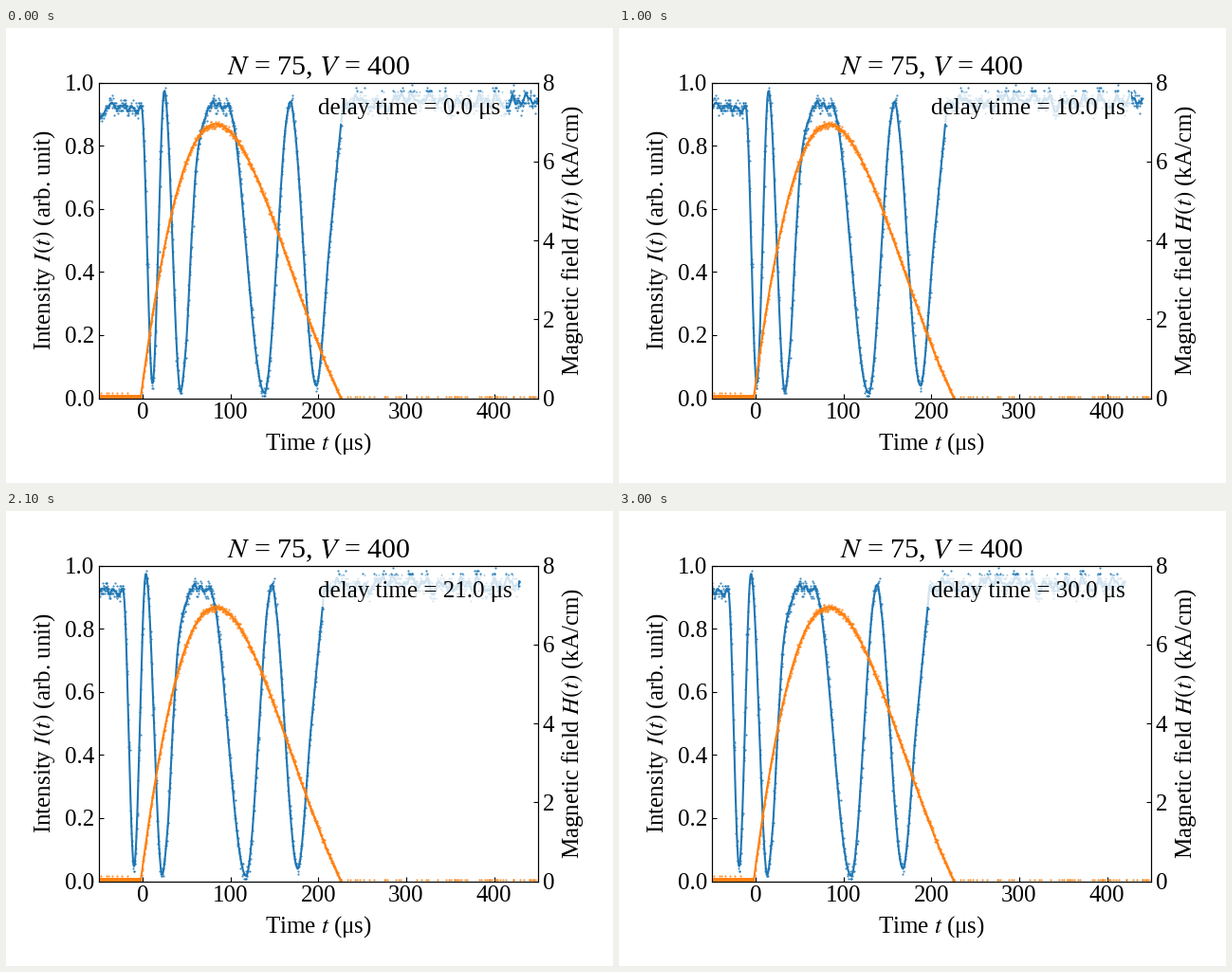
A matplotlib script for the animation above (3.1 s loop, 640x480 px).

```python
import numpy as np
import matplotlib.pyplot as plt
from matplotlib.animation import FuncAnimation

plt.rcParams.update({
    "font.family": "Liberation Serif",
    "mathtext.fontset": "stix",
    "font.size": 18,
    "xtick.direction": "in",
    "ytick.direction": "in",
})

W, H, DPI = 640, 480, 100
BLUE, ORANGE = "#1f77b4", "#ff7f0e"
STEPS, INTERVAL = 31, 100
PULSE_START, PULSE_END = -2.5, 226

# Turning points of the intensity: (time in µs, value)
KNOTS = np.array([
    (-60, 0.925), (-1.5, 0.925), (11, 0.048), (24.5, 0.972), (43, 0.024),
    (49, 0.16), (55, 0.48), (61, 0.74), (66, 0.84), (71, 0.89), (77, 0.925),
    (97, 0.93), (138.5, 0.018), (167.7, 0.937), (197.4, 0.04), (213, 0.5),
    (226, 0.87), (229, 0.942), (460, 0.942),
])


def monotone_curve(x, knots):
    """Cubic Hermite curve that is flat at every local extremum."""
    kx, ky = knots.T
    h = np.diff(kx)
    d = np.diff(ky) / h
    slope = np.zeros(len(kx))
    same = d[:-1] * d[1:] > 0
    a, b = d[:-1][same], d[1:][same]
    slope[1:-1][same] = 2 * a * b / (a + b)
    i = np.clip(np.searchsorted(kx, x, side="right") - 1, 0, len(h) - 1)
    u = (x - kx[i]) / h[i]
    return ((1 + 2 * u) * (1 - u) ** 2 * ky[i]
            + u * (1 - u) ** 2 * h[i] * slope[i]
            + u ** 2 * (3 - 2 * u) * ky[i + 1]
            + u ** 2 * (u - 1) * h[i] * slope[i + 1])


def smooth_noise(rng, n, width):
    k = np.arange(-4 * width, 4 * width + 1)
    kernel = np.exp(-0.5 * (k / width) ** 2)
    out = np.convolve(rng.normal(size=n + 8 * width), kernel, "valid")
    return out / out.std()


def quantize(v, step):
    return np.round(v / step) * step


rng = np.random.default_rng(7)
t = np.arange(-50, 450.2, 0.4)
n = len(t)

# Intensity: smooth curve and scattered samples
base = monotone_curve(t, KNOTS)
flat = np.clip((base - 0.86) / 0.06, 0, 1) * ((t < 10) | (t > 70))
late = t > 228
curve = base + smooth_noise(rng, n, 4) * (0.001 + 0.012 * flat)
samples = np.interp(t + rng.normal(size=n) * 0.5, t, curve)
samples += rng.normal(size=n) * np.where(late, 0.014, 0.011)
samples += late * (rng.random(n) < 0.06) * 0.02
samples = quantize(np.minimum(samples, 0.99), 0.008)

# Magnetic field: damped half sine with a small offset before the pulse
before, after = t < PULSE_START, t > PULSE_END
phase = np.pi * (t - PULSE_START) / (PULSE_END - PULSE_START)
pulse = 12.3 * np.exp(-0.00574 * (t - PULSE_START)) * np.sin(phase)
field = np.select([before, after], [0.06, -0.12], np.maximum(pulse, 0.04))
field_dots = quantize(field + rng.normal(size=n) * 0.045, 0.04)
field_dots[before] = np.where(rng.random(n) < 0.05, 0.14, 0.05)[before]
chance = np.where(t > 340, 0.12, 0.05)
field_dots[after] = np.where(rng.random(n) < chance, 0.05, -0.2)[after]

fig = plt.figure(figsize=(W / DPI, H / DPI), dpi=DPI, facecolor="white")
ax = fig.add_axes([98 / W, 89.4 / H, 462.8 / W, 333 / H])
ax.set(xlim=(-50, 450), ylim=(0, 1), xticks=range(0, 401, 100))
ax.set_title("$N$ = 75, $V$ = 400")
ax2 = ax.twinx()
ax2.set(ylim=(0, 8), yticks=range(0, 9, 2))


def label(x, y, s, rotation=0):
    fig.text(x / W, 1 - y / H, s, ha="center", va="baseline",
             rotation=rotation, rotation_mode="anchor")


label(329.4, 445, "Time $t$ (μs)")
label(47, 223.8, "Intensity $I(t)$ (arb. unit)", 90)
label(604, 223.5, "Magnetic field $H(t)$ (kA/cm)", 90)

dot_style = dict(ls="none", marker=".", ms=1)
dots, = ax.plot(t, samples, color=BLUE, **dot_style)
line, = ax.plot(t, curve, color=BLUE, lw=1.5)
ax2.plot(t, field_dots, color=ORANGE, **dot_style)
ax2.plot(t, field, color=ORANGE, lw=1.5)
note = ax.text(200, 0.9, "", bbox=dict(facecolor="white", edgecolor="none", alpha=0.8))


def update(i):
    delay = float(i)
    dots.set_xdata(t - delay)
    line.set_xdata(t - delay)
    note.set_text(f"delay time = {delay:.1f} μs")
    return dots, line, note


anim = FuncAnimation(fig, update, frames=STEPS, interval=INTERVAL,
                     repeat=True, repeat_delay=0, blit=False)
plt.show()
```
